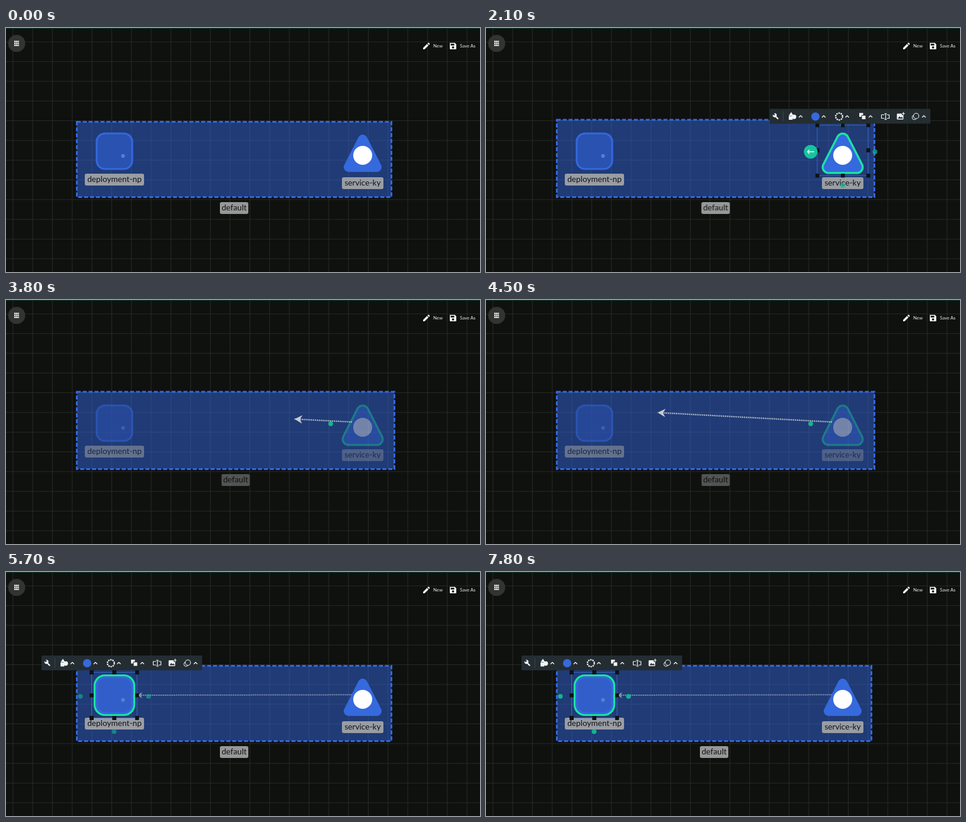
An HTML page that plays this animation: 800x412 px, repeating every 9700 ms.

```html
<!DOCTYPE html>
<html lang="en">
<head>
<meta charset="utf-8">
<title>Connecting two nodes</title>
<style>
html, body { margin: 0; width: 100%; height: 100%; overflow: hidden; background: #0f110f; }
svg { display: block; width: 800px; height: 412px; font-family: Lato, "Open Sans", sans-serif; }
.label { font-size: 13.7px; fill: #101214; text-anchor: middle; }
.menu-text { font-size: 7.8px; fill: #e8e8e8; }
.line { fill: none; stroke: #f2f4f4; stroke-width: 1.4; stroke-linejoin: round; }
.white { fill: #f2f4f4; }
.teal { fill: #14b38d; }
.green { fill: none; stroke: #1ce2a5; }

/* one loop is 9.7 s */
.fill, .border, .deploy, .service, .caption { animation: dim 9.7s linear infinite; }
.fill, .caption { --dim: .5; }
.border { --dim: .64; }
.deploy { --dim: .56; }
.service { --dim: .38; }
@keyframes dim {
  0%, 35% { opacity: 1 }
  39%, 56.6% { opacity: var(--dim) }
  56.7%, 100% { opacity: 1 }
}

.grow { animation: grow 9.7s step-end infinite; }
@keyframes grow {
  0%, 53.61%, 100% { y: 158.5px; width: 531px; height: 127px }
  7.22% { y: 155px; width: 536px; height: 130.5px }
}
.shift { animation: shift 9.7s step-end infinite; }
@keyframes shift {
  0%, 53.61%, 100% { transform: none }
  7.22% { transform: translateX(2.5px) }
}
.picked { animation: picked 9.7s step-end infinite; }
@keyframes picked {
  0%, 53.61%, 100% { opacity: 0 }
  7.22% { opacity: 1 }
}
.handles { animation: handles 9.7s linear infinite; }
@keyframes handles {
  0%, 7% { opacity: 0 }
  9.28%, 22% { opacity: .75 }
  28%, 100% { opacity: 0 }
}
.port { animation: port 9.7s step-end infinite; }
@keyframes port {
  0%, 21.65%, 53.61%, 100% { opacity: 0 }
  7.22%, 36.08% { opacity: 1 }
}
.tools { animation: tools 9.7s linear infinite; }
@keyframes tools {
  0%, 12.3% { opacity: 0 }
  15%, 23% { opacity: 1 }
  28%, 100% { opacity: 0 }
}
.button { animation: button 9.7s step-end infinite; }
@keyframes button {
  0%, 36.08%, 100% { opacity: 0 }
  21.65% { opacity: 1 }
}
.radial { transform-origin: 548px 209px; animation: radial 9.7s ease-out infinite; }
@keyframes radial {
  0%, 25.77% { opacity: 0; transform: scale(.4) }
  29%, 34% { opacity: 1; transform: none }
  36%, 100% { opacity: 0; transform: scale(.4) }
}
.drag { animation: drag 9.7s linear infinite, dragging 9.7s step-end infinite; }
@keyframes drag {
  0%, 36.08% { d: path("M584 206L546 207") }
  41.24% { d: path("M584 206L448 197") }
  46.39% { d: path("M584 206L290 190") }
  49.4% { d: path("M584 207L226 202") }
  50.52%, 100% { d: path("M584 207L222 208") }
}
@keyframes dragging {
  0%, 53.61%, 100% { opacity: 0 }
  36.08% { opacity: 1 }
}
.target { animation: target 9.7s step-end infinite; }
@keyframes target {
  0% { opacity: 0; stroke-dasharray: 1.6 1.1 }
  50.52% { opacity: 1; stroke-dasharray: 1.6 1.1 }
  58.76%, 100% { opacity: 1; stroke-dasharray: none }
}
.body { animation: body 9.7s step-end infinite; }
@keyframes body {
  0% { fill: #2a52b0 }
  58.76%, 100% { fill: #315ec8 }
}
.linked { animation: linked 9.7s step-end infinite; }
@keyframes linked {
  0% { opacity: 0 }
  58.76%, 100% { opacity: 1 }
}
.ports { animation: ports 9.7s linear infinite; }
@keyframes ports {
  0%, 58.7% { opacity: 0 }
  58.76% { opacity: .6 }
  63.92%, 100% { opacity: 1 }
}
</style>
</head>
<body>
<svg viewBox="0 0 800 412">
  <defs>
    <pattern id="grid" x="11.2" y="22.9" width="33.32" height="33.3" patternUnits="userSpaceOnUse">
      <path d="M.5 0V34M0 .5H34" stroke="#282a28" fill="none"/>
    </pattern>
    <marker id="grip" markerWidth="8" markerHeight="8" refX="3.5" refY="3.5" markerUnits="userSpaceOnUse">
      <path d="M0 0h7v7h-7z" fill="#0e1215"/>
    </marker>
    <marker id="tip" markerWidth="16" markerHeight="16" refX="13" refY="7" markerUnits="userSpaceOnUse" orient="auto">
      <path d="M0 0L13 7L0 14L4 7z" fill="#c8cbd0"/>
    </marker>
    <marker id="vee" markerWidth="12" markerHeight="14" refX="9" refY="6" markerUnits="userSpaceOnUse" orient="auto">
      <path d="M1 1L9 6L1 11L4 6z" fill="#9ba5b9"/>
    </marker>
    <path id="caret" class="line" d="M-3 1.5L0 -1.5L3 1.5"/>

    <g id="toolbar">
      <rect width="271" height="25" rx="1" fill="#242d32"/>
      <path d="M22.5 4v17" stroke="#3b454a"/>
      <path d="M8.5 11.500L13.500 16.500" stroke="#f2f4f4" stroke-width="2.400" stroke-linecap="round"/>
      <path class="white" d="M5 9.500L7 11.500L9 9.500L7 7.500A3.500 3.500 0 1 1 5 9.500z"/>
      <path class="white" d="M36 5.500l4 6h-8z"/>
      <rect class="white" x="32" y="12" width="6.500" height="6.500"/>
      <circle class="white" cx="41" cy="13.500" r="3.700"/>
      <circle cx="77" cy="13" r="7" fill="#3569de"/>
      <circle class="line" cx="117" cy="13" r="5.800" stroke-dasharray="2.300 1.340" style="stroke-width:2.400"/>
      <path class="white" d="M151 7h6.500v6.500h-6.500z"/>
      <path d="M155 11h7v7h-7z" fill="#f2f4f4" stroke="#242d32"/>
      <path class="line" d="M193.500 10h-5v6h5M197.500 10h4v6h-4M195.500 8v10M193.500 8h4M193.500 18h4" style="stroke-width:1.200"/>
      <rect class="white" x="214.500" y="8" width="11" height="10" rx="1.200"/>
      <path d="M216 16.500l3-4l2 2.500l1.500-1.800l2.500 3.300z" fill="#242d32"/>
      <circle cx="225.500" cy="8" r="3" fill="#242d32"/>
      <path class="line" d="M225.500 5.500v5M223 8h5" style="stroke-width:1.200"/>
      <circle class="line" cx="244" cy="14.500" r="3.800" style="stroke-width:1"/>
      <circle cx="247" cy="12" r="4.500" fill="#242d32" stroke="#f2f4f4" stroke-width="1.100"/>
      <use href="#caret" x="52" y="13"/>
      <use href="#caret" x="91" y="13"/>
      <use href="#caret" x="130.500" y="13"/>
      <use href="#caret" x="170" y="13"/>
      <use href="#caret" x="260" y="13"/>
    </g>
  </defs>

  <rect width="800" height="412" fill="url(#grid)"/>
  <path d="M0 .5H800" stroke="#0b3c2d"/>

  <!-- page controls -->
  <circle cx="18" cy="26" r="14.500" fill="#323431"/>
  <path d="M14.200 22.700h8M14.200 26h8M14.200 29.300h8" stroke="#f4f4f4" stroke-width="2.500" stroke-dasharray="2.500 .7" transform="translate(-.3)"/>
  <path class="white" d="M704 33.500v2.500h2.500l6.500-6.500l-2.500-2.500zM711.300 26.200l2.500 2.500l1.200-1.200q.7-.7 0-1.300l-1.200-1.200q-.6-.6-1.300 0z"/>
  <text class="menu-text" x="721" y="33.300">New</text>
  <path class="white" fill-rule="evenodd" d="M750 25h7.500l2.500 2.500v7.500q0 1-1 1h-9q-1 0-1-1v-9q0-1 1-1zM750.500 26.500v3h6v-3zM754.500 31a1.800 1.800 0 1 0 .01 0z"/>
  <text class="menu-text" x="766" y="33.300">Save As</text>

  <!-- namespace -->
  <rect class="fill grow" x="119.500" y="158.500" width="531" height="127" fill="#3367dd" fill-opacity=".5"/>
  <rect class="border grow" x="119.500" y="158.500" width="531" height="127" fill="none" stroke="#3468de" stroke-width="3" stroke-dasharray="6.700 3.300"/>
  <g class="caption">
    <g class="shift">
      <rect x="361" y="294" width="48" height="20" rx="3" fill="#969898"/>
      <text class="label" x="385" y="308.300">default</text>
    </g>
  </g>

  <path class="linked" d="M583 207.300L222 208" fill="none" stroke="#9ba5b9" stroke-width="2" stroke-dasharray="1.600 1.500" marker-end="url(#vee)"/>

  <g class="deploy">
    <rect class="target green" x="149.700" y="174.700" width="66.600" height="66.600" rx="17" stroke-width="3.600"/>
    <rect class="body" x="153" y="178" width="60" height="60" rx="14" fill="#2a52b0" stroke="#3468de" stroke-width="3.200"/>
    <circle cx="197.500" cy="216" r="2.600" fill="#5078cf" stroke="#6f8fd8"/>
    <rect x="133" y="246" width="100" height="20" rx="3" fill="#999da4"/>
    <text class="label" x="183" y="260.300">deployment-np</text>
  </g>

  <g class="service">
    <path class="picked green" d="M602 188L578 235H626z" stroke-width="23" stroke-linejoin="round"/>
    <path d="M602 188L578 235H626z" fill="#3569de" stroke="#3569de" stroke-width="16" stroke-linejoin="round"/>
    <circle cx="602" cy="215" r="16" fill="#fff"/>
    <rect x="567" y="252" width="70" height="20" rx="3" fill="#999da4"/>
    <text class="label" x="602" y="266.300">service-ky</text>
  </g>

  <!-- connecting from the service -->
  <circle class="port teal" cx="548" cy="209" r="4"/>
  <g class="handles teal">
    <circle cx="656.500" cy="209" r="4"/>
    <circle cx="602" cy="265.500" r="4"/>
    <circle cx="602" cy="163" r="4"/>
  </g>
  <path class="drag" d="M584 206L546 207" fill="none" stroke="#c8cbd0" stroke-width="2.400" stroke-dasharray="1.700 1.500" marker-end="url(#tip)"/>
  <g class="tools">
    <path d="M559 164h43h43v42.500v42.500h-43h-43v-42.500z" fill="none" stroke="#3f73dc" stroke-width=".8" marker-start="url(#grip)" marker-mid="url(#grip)"/>
    <use href="#toolbar" x="479" y="136.500"/>
  </g>
  <g class="radial">
    <g fill="#263034">
      <circle cx="548" cy="177" r="11"/>
      <circle cx="515.500" cy="209" r="11"/>
      <circle cx="548" cy="241" r="11"/>
    </g>
    <path class="white" d="M548 170.500l4.500 9.500l-3.800-3.500v6.500h-1.400v-6.500l-3.800 3.500z"/>
    <path class="white" d="M509 207.800h7v-3.300l6.500 4.500l-6.500 4.500v-3.300h-7z"/>
    <circle class="line" cx="548" cy="241" r="5.700"/>
    <path class="line" d="M546 239.700q0-2 2-2t2 1.800q0 1-1.200 1.700q-.8.500-.8 1.500M548 243.600v1.200" style="stroke-width:1.200"/>
  </g>
  <g class="button">
    <circle cx="548" cy="209" r="11.500" fill="#16c4a0"/>
    <path class="line" d="M554 209h-11.500M546 205.500l-3.500 3.500l3.500 3.500"/>
  </g>

  <!-- deployment selected -->
  <g class="ports teal">
    <circle cx="125.500" cy="210" r="4"/>
    <circle cx="182.500" cy="269.500" r="4"/>
    <circle cx="240.500" cy="210" r="4"/>
  </g>
  <g class="linked">
    <path d="M144.500 169.500h38.300h38.200v38.500v38.500h-38.200h-38.300v-38.500z" fill="none" stroke="#3f73dc" stroke-width=".8" marker-start="url(#grip)" marker-mid="url(#grip)"/>
    <use href="#toolbar" x="60" y="141"/>
  </g>
</svg>
</body>
</html>
```
